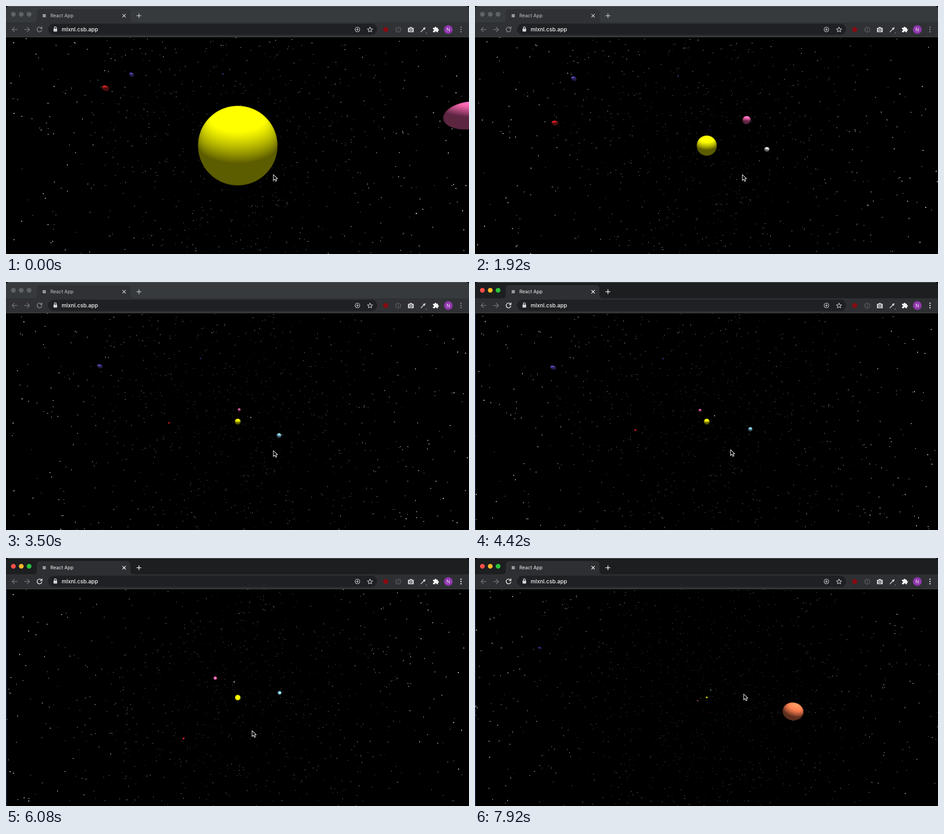
An HTML page with a canvas that plays this animation: 1023 px wide and 548 px high, repeating every 8 s.

```html
<!DOCTYPE html>
<html lang="en">
<head>
<meta charset="utf-8">
<title>Solar system</title>
<style>
  html, body { margin: 0; width: 100%; height: 100%; overflow: hidden; background: #000; }
  canvas, svg { position: absolute; left: 0; top: 0; width: 1023px; height: 548px; }
  svg { font-family: Inter, Roboto, sans-serif; --strip: #363a3c; --bar: #2f3134; --icon: #8b8d90; --tab: #c3c5c7; }
  svg.focused { --strip: #1c1e20; --bar: #2d2f32; --icon: #f4f4f4; --tab: #f4f4f4; }
  .line { fill: none; stroke-width: 1.5; stroke-linecap: round; stroke-linejoin: round; }
  .lights circle { fill: #606365; }
  .focused .lights circle:nth-child(1) { fill: #ff5047; }
  .focused .lights circle:nth-child(2) { fill: #fdb827; }
  .focused .lights circle:nth-child(3) { fill: #29c53b; }
  #edge { display: none; }
  .focused #edge { display: block; }
</style>
</head>
<body>
<canvas id="space" width="1023" height="548"></canvas>
<svg id="window" viewBox="0 0 1023 548">
  <rect width="1023" height="69" fill="#000"/>
  <path d="M0 69V7Q0 0 7 0H1016Q1023 0 1023 7V69Z" fill="var(--strip)"/>
  <path d="M5 .5H1018" stroke="#67696b"/>
  <path d="M0 36H60Q68 36 68 28V15Q68 7 76 7H267Q275 7 275 15V28Q275 36 283 36H1023V68H0Z" fill="var(--bar)"/>
  <path d="M0 68.5H1023" stroke="#494b4e"/>
  <path id="edge" d="M.5 69V548" stroke="#29487c"/>
  <g class="lights">
    <circle cx="16.3" cy="18.3" r="5.3"/><circle cx="33.7" cy="18.3" r="5.3"/><circle cx="51" cy="18.3" r="5.3"/>
  </g>
  <rect x="81" y="18" width="7" height="7" fill="#96989a"/>
  <text x="98" y="25" font-size="10.5" fill="var(--tab)">React App</text>
  <g class="line" stroke="var(--tab)">
    <path d="M257.8 18.3L264.2 24.7M264.2 18.3L257.8 24.7M289 21.5H298.4M293.7 16.8V26.2"/>
  </g>
  <g class="line" stroke="#75777a">
    <path d="M24.5 52H13.5M18.5 47L13.5 52L18.5 57"/>
    <path d="M41 52H52M47 47L52 52L47 57"/>
  </g>
  <path class="line" stroke="var(--icon)" d="M78 48.2A5.3 5.3 0 1 0 79.2 53.3M79.5 46V50H75.5"/>
  <rect x="93" y="39" width="727" height="25" rx="12.5" fill="#1f2023"/>
  <rect x="105" y="50" width="8" height="6.5" rx="1" fill="#d2d4d6"/>
  <path class="line" stroke="#d2d4d6" d="M106.8 50V48.3A2.2 2.2 0 0 1 111.2 48.3V50"/>
  <text x="123" y="56" font-size="12" font-weight="500" fill="#f4f4f5">mlxnl.csb.app</text>
  <g class="line" stroke="#c8cacc" style="stroke-width:1.2">
    <circle cx="776.5" cy="51.8" r="5.2"/><path d="M773.8 51.8H779.2M776.5 49.1V54.5"/>
    <path d="M804.3 46.4L805.9 50.2L810 50.5L806.9 53.2L807.9 57.2L804.3 55L800.7 57.2L801.7 53.2L798.6 50.5L802.7 50.2Z"/>
    <circle cx="866.7" cy="52.2" r="5.6" stroke="#66686b"/><path d="M866.7 49.5V55" stroke="#66686b"/>
  </g>
  <circle cx="839" cy="52" r="5.6" fill="#870b12"/>
  <path d="M889 48H891.5L892.7 46.3H896.3L897.5 48H900Q901 48 901 49V57Q901 58 900 58H889Q888 58 888 57V49Q888 48 889 48Z" fill="#c6c8ca"/>
  <circle cx="894.5" cy="53" r="2.6" fill="#c6c8ca" stroke="#3a3c40" stroke-width="1.2"/>
  <path d="M916.5 57.5L923.5 50.5" stroke="#b7b9bb" stroke-width="2"/>
  <path d="M922 48.5L925.5 52M924 50L926.5 47.5" stroke="#d8dadc" stroke-width="2.4"/>
  <rect x="928" y="59" width="1.4" height="1.4" fill="#ddd"/>
  <path d="M943.5 48H947.3V47.5A1.8 1.8 0 0 1 950.9 47.5V48H954.3V51.2H954.8A1.8 1.8 0 0 1 954.8 54.8H954.3V58H951.2V57.5A1.7 1.7 0 0 0 947.8 57.5V58H943.5V54.7H944A1.7 1.7 0 0 0 944 51.3H943.5Z" fill="#f3f3f3"/>
  <circle cx="977.3" cy="52" r="9.7" fill="#9037ad"/>
  <text x="977.3" y="55.8" font-size="10.5" text-anchor="middle" fill="#f1e5f4">N</text>
  <g fill="var(--icon)"><circle cx="1005.3" cy="47" r="1.4"/><circle cx="1005.3" cy="52" r="1.4"/><circle cx="1005.3" cy="57" r="1.4"/></g>
  <path id="cursor" d="M.7 .7V13.4L3.7 10.6L5.8 15.3L8.2 14.2L6.1 9.7H10Z" fill="#000" stroke="#fff" stroke-width="1.1" stroke-linejoin="round"/>
</svg>
<script>
const LOOP = 8000, STEP = LOOP / 96;
const CENTER = { x: 512, y: 308.5 }, FOCAL = 313;
const RAD = Math.PI / 180;
const chrome = document.getElementById('window');
const cursor = document.getElementById('cursor');
const ctx = document.getElementById('space').getContext('2d');
const scratch = document.createElement('canvas');
const brush = scratch.getContext('2d', { willReadFrequently: true });

// Orbit radius, size, angle at the start (degrees), degrees per second, colour.
const body = (orbit, size, start, speed, color) => ({ orbit, size, start, speed, color });
const bodies = [
  body(0, 2, 0, 0, [255, 255, 0]),
  body(11.5, 0.45, -59, 26.6, [225, 220, 215]),
  body(21.3, 1.22, 16, 20.2, [255, 105, 180]),
  body(29.8, 1.3, -95, 16.7, [135, 206, 235]),
  body(46.5, 0.66, 136.3, 13.3, [208, 32, 32]),
  body(161, 16, -60.6, 1.2, [255, 127, 80]),
  body(306, 14, 214, 1.2, [238, 230, 216]),
  body(540, 5.4, 124.2, 4.1, [98, 78, 205]),
  body(770, 4.6, 95.4, 2.75, [66, 52, 160])
];

// Keyframes are [time, value] pairs.
const distanceKeys = [[0, 7.4], [1250, 9.55], [2667, 96], [4417, 100], [6083, 100], [6750, 285], [7917, 291]];
const tiltKeys = [[0, 27], [5000, 27], [5900, 84], [6850, 84], [7900, 35]];
const turnKeys = [[0, 0], [6850, 0], [7900, 35.5]];
const cursorX = [[0, 590], [3700, 590], [4417, 564], [5000, 545], [5900, 543], [6850, 543], [7900, 593]];
const cursorY = [[0, 372], [3700, 372], [4417, 370], [5000, 305], [5900, 381], [6850, 381], [7900, 300]];
const FOCUS_AT = 3800;

function at(keys, t) {
  const i = keys.findIndex(k => k[0] > t);
  if (i < 0) return keys[keys.length - 1][1];
  const [t0, a] = keys[i - 1], [t1, b] = keys[i];
  return a + (b - a) * (t - t0) / (t1 - t0);
}
const logDistance = distanceKeys.map(([t, d]) => [t, Math.log(d)]);

let seed = 20117;
function random() {
  seed = (seed + 0x6D2B79F5) | 0;
  let h = Math.imul(seed ^ (seed >>> 15), seed | 1);
  h ^= h + Math.imul(h ^ (h >>> 7), h | 61);
  return ((h ^ (h >>> 14)) >>> 0) / 4294967296;
}
const stars = Array.from({ length: 5000 }, () => {
  const y = random() * 2 - 1, angle = random() * 2 * Math.PI;
  const radius = 850 + 120 * random(), flat = radius * Math.sqrt(1 - y * y);
  return { y: y * radius, flat, angle, size: 0.5 + 0.5 * random() };
});

function cameraAt(t) {
  const tilt = at(tiltKeys, t) * RAD;
  return {
    distance: Math.exp(at(logDistance, t)), turn: at(turnKeys, t) * RAD,
    sin: Math.sin(tilt), cos: Math.cos(tilt)
  };
}

// Camera space: x right, y up, z away from the viewer.
function toView(radius, angle, height, cam) {
  const depth = radius * Math.sin(angle + cam.turn);
  return {
    x: radius * Math.cos(angle + cam.turn),
    y: height * cam.cos + depth * cam.sin,
    z: cam.distance + depth * cam.cos - height * cam.sin
  };
}

function drawStars(t, cam) {
  ctx.fillStyle = '#eee';
  const drift = t / 1000 * 1.2 * RAD;
  for (const star of stars) {
    const p = toView(star.flat, star.angle + drift, star.y, cam);
    if (p.z < 20) continue;
    const x = CENTER.x + FOCAL * p.x / p.z, y = CENTER.y - FOCAL * p.y / p.z;
    if (x < 0 || x > 1023 || y < 68 || y > 548) continue;
    const s = Math.min(2, star.size * 1050 / p.z);
    ctx.globalAlpha = Math.min(1, 0.45 + s * 0.28);
    ctx.fillRect(x - s / 2, y - s / 2, s, s);
  }
  ctx.globalAlpha = 1;
}

// Paints a lit ball into the scratch canvas.
function paintBall(n, color, light) {
  scratch.width = scratch.height = n;
  const image = brush.createImageData(n, n), half = n / 2;
  for (let j = 0, o = 0; j < n; j++) {
    for (let i = 0; i < n; i++, o += 4) {
      const u = (i + 0.5 - half) / (half - 1), v = (j + 0.5 - half) / (half - 1);
      const rr = u * u + v * v;
      const w = Math.sqrt(Math.max(0, 1 - rr));
      const lit = 0.36 + 0.87 * Math.max(0, u * light[0] + v * light[1] + w * light[2]);
      for (let c = 0; c < 3; c++) image.data[o + c] = Math.min(255, color[c] * lit);
      image.data[o + 3] = 255 * Math.max(0, Math.min(1, (1 - Math.sqrt(rr)) * (half - 1) + 0.5));
    }
  }
  brush.putImageData(image, 0, 0);
}

function drawBody({ size, color }, p, cam) {
  const depth2 = p.z * p.z - size * size;
  if (p.z <= 0 || depth2 <= 0) return;
  const length = Math.hypot(p.x, p.y, p.z), off = Math.hypot(p.x, p.y);
  const minor = FOCAL * size / Math.sqrt(depth2);
  const major = minor * Math.sqrt((length * length - size * size) / depth2);
  const x = CENTER.x + FOCAL * p.x * p.z / depth2;
  const y = CENTER.y - FOCAL * p.y * p.z / depth2;
  if (x + major < 0 || x - major > 1023 || y + major < 68 || y - major > 548) return;

  // The light shines straight down on the orbits, seen along the ray to the ball.
  const cx = off ? p.x / off : 1, cy = off ? p.y / off : 0;
  const light = [
    (cy * p.z * cam.cos + off * cam.sin) / length,
    -cx * cam.cos,
    (p.z * cam.sin - p.y * cam.cos) / length
  ];
  const n = Math.min(260, Math.ceil(2 * minor) + 2);
  paintBall(n, color, light);
  const grow = n / (n - 2);
  ctx.save();
  ctx.translate(x, y);
  ctx.rotate(Math.atan2(-cy, cx));
  ctx.drawImage(scratch, -major * grow, -minor * grow, 2 * major * grow, 2 * minor * grow);
  ctx.restore();
}

function render(t) {
  const cam = cameraAt(t);
  ctx.fillStyle = '#000';
  ctx.fillRect(0, 0, 1023, 548);
  drawStars(t, cam);
  bodies
    .map(b => ({ b, p: toView(b.orbit, (b.start + b.speed * t / 1000) * RAD, 0, cam) }))
    .sort((a, b) => b.p.z - a.p.z)
    .forEach(({ b, p }) => drawBody(b, p, cam));
  chrome.classList.toggle('focused', t >= FOCUS_AT);
  cursor.setAttribute('transform', `translate(${at(cursorX, t)} ${at(cursorY, t)})`);
}

function tick(now) {
  render(Math.floor(((now + 4) % LOOP) / STEP) * STEP);
  requestAnimationFrame(tick);
}
render(0);
requestAnimationFrame(tick);
</script>
</body>
</html>
```
